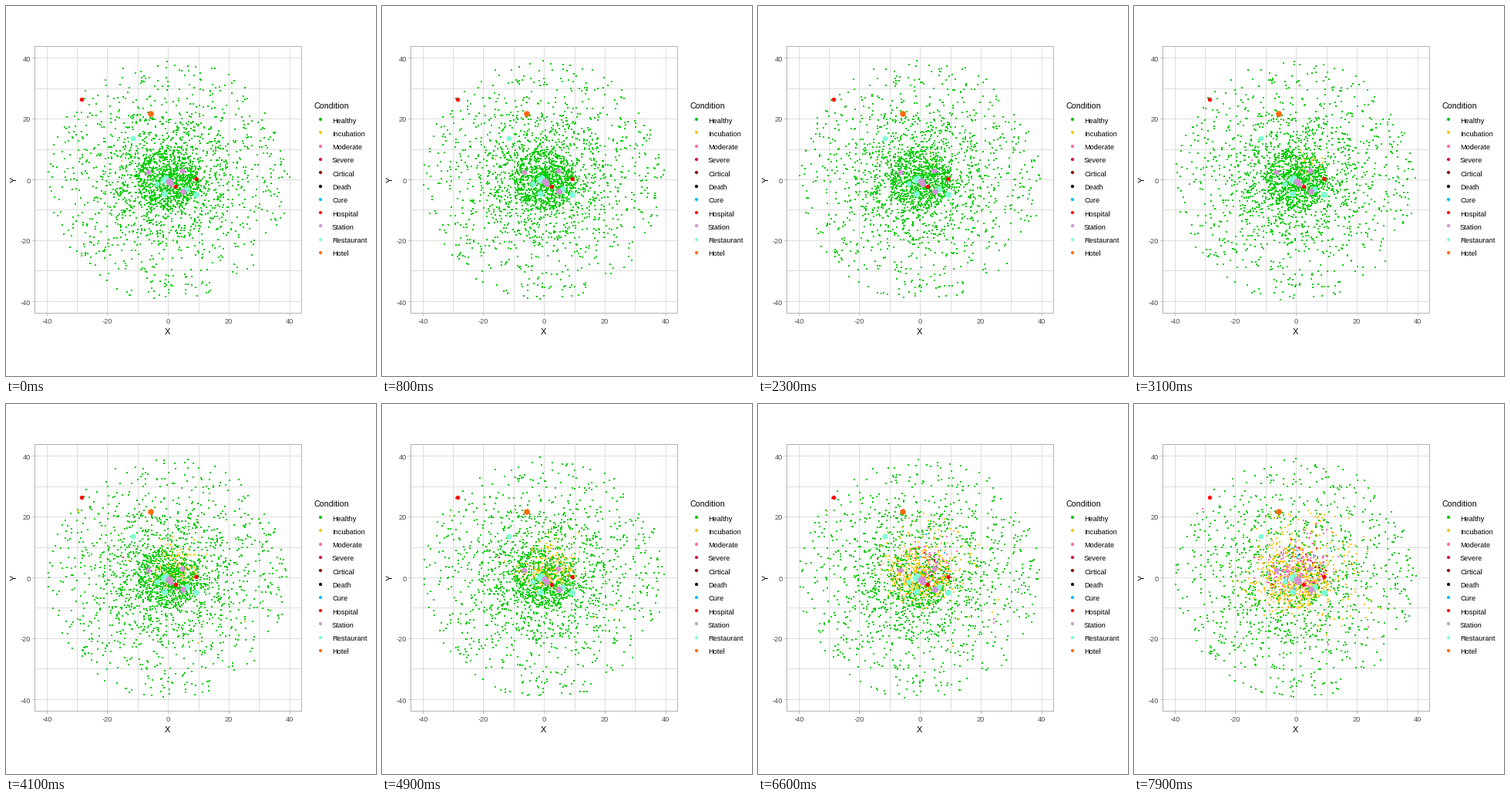
A matplotlib script for the animation above (8000 ms loop, 480x480 px).

```python
import numpy as np
import matplotlib.pyplot as plt
from matplotlib.animation import FuncAnimation
from matplotlib.patches import Rectangle

SIZE, FRAMES, STEP = 480, 80, 100
PT = 0.72  # points per pixel at 100 dpi
plt.rcParams["font.family"] = "Liberation Sans"

LEGEND = [
    ("Healthy", "#00CD00"), ("Incubation", "#FFC514"), ("Moderate", "#FF69B4"),
    ("Severe", "#DC143C"), ("Cirtical", "#8B0000"), ("Death", "#000000"),
    ("Cure", "#00BFFF"), ("Hospital", "#FF0000"), ("Station", "#D294D2"),
    ("Restaurant", "#7FFFD4"), ("Hotel", "#FF6A0A"),
]
COLORS = np.array([c for _, c in LEGEND])
HEALTHY, INCUBATION, MODERATE, SEVERE, CRITICAL, DEATH, CURE = range(7)
HOSPITAL, STATION, RESTAURANT, HOTEL = range(7, 11)

# kind, x, y, diameter in pixels
PLACES = [
    (RESTAURANT, 165, 172, 7), (RESTAURANT, 205, 226, 9), (RESTAURANT, 208, 223, 7),
    (RESTAURANT, 196, 231, 7), (RESTAURANT, 206, 244, 8), (RESTAURANT, 235, 238, 8),
    (RESTAURANT, 247, 245, 8), (STATION, 185, 216, 7), (STATION, 229, 214, 7),
    (STATION, 230, 241, 8), (STATION, 212, 228, 9), (STATION, 214, 231, 8),
    (HOSPITAL, 98.5, 121.5, 5.4), (HOSPITAL, 220.5, 234.5, 5.4),
    (HOSPITAL, 247, 224.5, 5.4), (HOTEL, 188, 140, 7.6),
]


def px(x):
    return 210.62 + 3.94 * np.asarray(x)


def py(y):
    return 225.5 - 3.94 * np.asarray(y)


fig = plt.figure(figsize=(SIZE / 100, SIZE / 100), dpi=100, facecolor="white")
ax = fig.add_axes([0, 0, 1, 1])
ax.set(xlim=(0, SIZE), ylim=(SIZE, 0))
ax.axis("off")


def line(xs, ys, color, z=1):
    ax.plot(xs, ys, color=color, lw=PT, zorder=z, snap=False,
            solid_capstyle="butt")


def label(x, y, s, size=9.3, color="black", **kw):
    ax.text(x, y, s, fontsize=size * PT, color=color, **kw)


def dots(xs, ys, diameters, colors, z):
    ax.scatter(xs, ys, s=(np.asarray(diameters) * PT) ** 2, c=colors,
               linewidths=0, zorder=z)


# panel
LEFT, RIGHT, TOP, BOTTOM = 37.5, 383.5, 52.5, 398.5
for v in range(-40, 41, 10):
    gx, gy = np.floor(px(v)) + 0.5, np.floor(py(v)) + 0.5
    line([gx, gx], [TOP, BOTTOM], "#DEDEDE")
    line([LEFT, RIGHT], [gy, gy], "#DEDEDE")
    if v % 20 == 0:
        line([gx, gx], [BOTTOM, BOTTOM + 3], "#B3B3B3")
        line([LEFT - 3, LEFT], [gy, gy], "#B3B3B3")
        label(gx - 0.5, 412, str(v), color="#4D4D4D", ha="center")
        label(32, gy + 4, str(v), color="#4D4D4D", ha="right")
ax.add_patch(Rectangle((LEFT, TOP), RIGHT - LEFT, BOTTOM - TOP, fill=False,
                       ec="#B3B3B3", lw=PT, snap=False, zorder=5))
label(209.5, 426, "X", 11, ha="center")
label(10.5, 225, "Y", 11, ha="center", va="center", rotation=90)

# legend
label(400, 133, "Condition", 10.6)
rows = 147.5 + 17.3 * np.arange(len(LEGEND))
for y, (name, _) in zip(rows, LEGEND):
    label(423, y + 4, name)
dots(np.full(len(rows), 408), np.floor(rows), np.full(len(rows), 4.2), COLORS, 3)

kind, place_x, place_y, place_d = zip(*PLACES)
dots(place_x, place_y, place_d, COLORS[list(kind)], 4)

# people: a dense core disc, a ring around it and a wide thinning field
rng = np.random.default_rng(19)
CORE, RING, FIELD = 580, 380, 1500
N = CORE + RING + FIELD
radius = np.concatenate([
    10 * np.sqrt(rng.random(CORE)),
    8 + 14 * rng.random(RING),
    40 * rng.random(FIELD) ** 1.1,
])
angle = rng.uniform(0, 2 * np.pi, N)
home = np.column_stack([radius * np.cos(angle), radius * np.sin(angle)])
limit = np.where(np.arange(N) < CORE, 10, 40)
leaves = np.where(np.arange(N) < CORE + RING, rng.uniform(0, 300, N), 999)


def spread(focus, start, pace, scale):
    """Frame at which infection starting at a focus reaches each person."""
    return start + pace * np.hypot(*(home - focus).T) + rng.gamma(2, scale, N)


onset = np.minimum.reduce([
    spread((4, 6), 8, 2.8, 22),
    spread((20, -15), 20, 3.2, 45),
    spread((-5, 1), 30, 2.8, 18),
])
stray = rng.random(N) < 0.008
onset[stray] = rng.uniform(-8, 130, stray.sum())
sick = onset + np.clip(rng.normal(28, 7, N), 8, None)
fate = rng.random(N)


def condition(i):
    state = np.full(N, HEALTHY)
    state[i >= onset] = INCUBATION
    state[i >= sick] = MODERATE
    state[(i >= sick + 9) & (fate < 0.16)] = SEVERE
    state[(i >= sick + 18) & (fate < 0.03)] = CRITICAL
    state[(i >= sick + 22) & (fate < 0.008)] = DEATH
    state[(i >= sick + 8) & (fate > 0.86)] = CURE
    return state


def positions(i):
    pos = home + np.random.default_rng([5, i]).normal(0, 0.55, (N, 2))
    r = np.hypot(*pos.T)
    over = r > limit
    pos[over] *= (limit / r)[over, None] * 0.98
    return np.column_stack([np.round(px(pos[:, 0])), np.round(py(pos[:, 1]))])


crowd = ax.scatter(np.zeros(N), np.zeros(N), s=(2 * PT) ** 2, marker="s",
                   linewidths=0, antialiased=False, zorder=3)


def update(i):
    here = leaves > i
    crowd.set_offsets(positions(i)[here])
    crowd.set_facecolor(COLORS[condition(i)][here])
    return (crowd,)


anim = FuncAnimation(fig, update, frames=FRAMES, interval=STEP,
                     repeat=True, repeat_delay=0)
plt.show()
```
